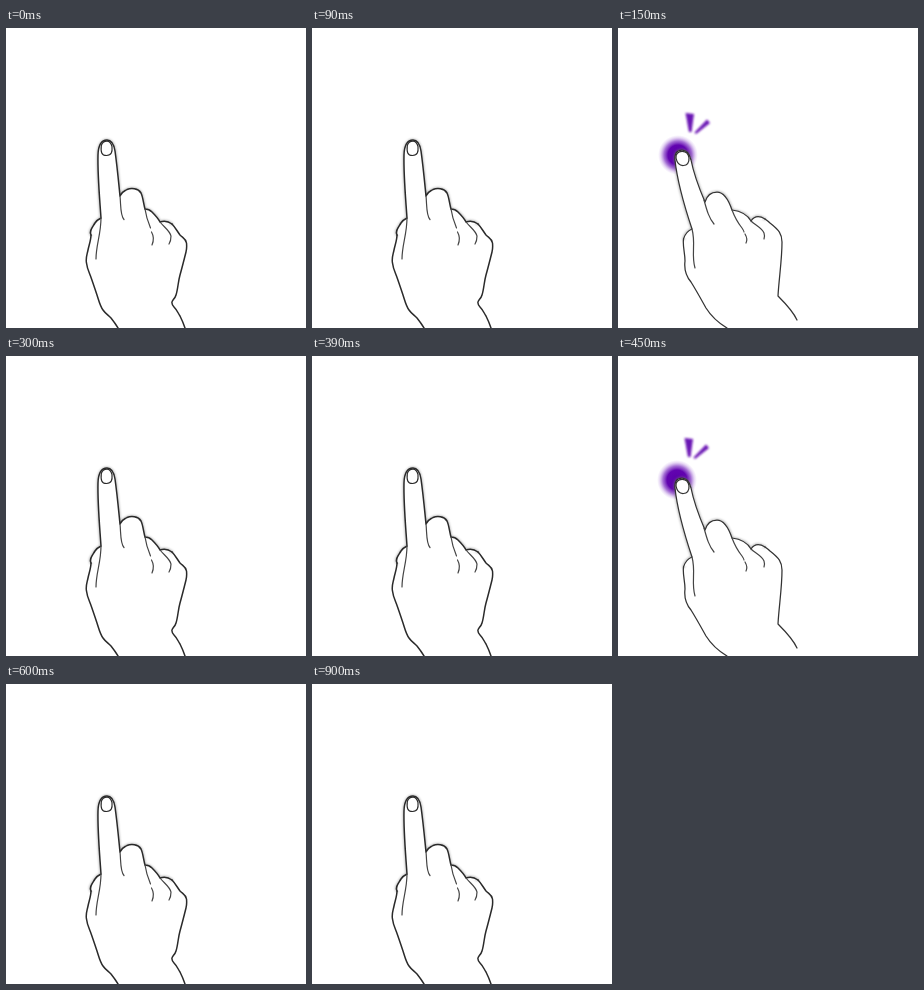
An HTML page that plays this animation: 300x300 px, repeating every 1100 ms.

```html
<!DOCTYPE html>
<html lang="en">
<head>
<meta charset="utf-8">
<title>Tapping finger</title>
<style>
  html, body { margin: 0; width: 100%; height: 100%; overflow: hidden; background: #fff; }
  svg { display: block; width: 100vw; height: 100vh; }
  .pose { fill: none; stroke-linecap: round; stroke-linejoin: round; }
  .skin { fill: #fff; }
  .halo { stroke: #777; stroke-width: 2.6; opacity: .5; filter: url(#soft); }
  .crease { stroke: #444; stroke-width: 1.2; }
  #rest { stroke: #2a2a2a; stroke-width: 1.5; }
  #press { stroke: #333; stroke-width: 1.25; }
  #press, #tap { visibility: hidden; }
</style>
</head>
<body>
<svg viewBox="0 0 300 300">
  <defs>
    <radialGradient id="glow">
      <stop offset="0" stop-color="#5a00a8"/>
      <stop offset=".5" stop-color="#6204b0"/>
      <stop offset=".7" stop-color="#7a2cc0" stop-opacity=".68"/>
      <stop offset=".87" stop-color="#9a5cd2" stop-opacity=".24"/>
      <stop offset="1" stop-color="#b98ae2" stop-opacity="0"/>
    </radialGradient>
    <filter id="soft" x="-20%" y="-20%" width="140%" height="140%"><feGaussianBlur stdDeviation="1"/></filter>
    <filter id="haze" x="-20%" y="-20%" width="140%" height="140%"><feGaussianBlur stdDeviation=".8"/></filter>

    <!-- fingers, from thumb side to little finger -->
    <path id="restTop" d="M85 207C83 203 86 200 89 195Q91 192 95 190C93.500 168 91.500 147 92 127C92.300 117 96 112 101 112C105.500 112 108 117 109 123C111 137 112.500 153 114 168C116 163 119 163 121 161.500C125 160 132 160 135 165C137 169 137.500 176 139 181C142 181 144 182 146 184C149 187 152 190 154 194C158 192.500 162 193 166 196"/>
    <path id="pressTop" d="M65.500 211C67 206 69 203 74 201C65 174 59 151 57 132C56.500 125 59 122 64 122C69 122 71.500 125.500 73 132C76 147 81 160 87 174C89 167 94 164 99 164C107 164 111 173 114 182C122 183 129 186 133 193C137 187 142 188 147 191"/>
  </defs>

  <g id="tap">
    <circle cx="60" cy="127" r="20" fill="url(#glow)"/>
    <g fill="#6a12b4" filter="url(#haze)">
      <path d="M67.500 85L76 86L73.500 104L71 104Z"/>
      <path d="M89 91.500L92 95L78 106L76.500 104.500Z"/>
    </g>
  </g>

  <g id="rest" class="pose">
    <use href="#restTop" class="halo"/>
    <use href="#restTop" class="skin"/>
    <path d="M85 207C85 212 83 217 82 222C81 227 79.500 230 80.500 235C81 240 83 244 84.500 248C87 255 89 261 91 267C93 273 94 278 97 282C99 285 102 287 105 290Q109 295 112 300"/>
    <path d="M166 196C169 199 171 203 174 207C177 210 180 211 180.500 215Q181 220 180 224C178 232 176 240 174 247C172 254 172 261 170 267C169 271 165 273 166 275C166 277 167 278 168 279C171 282 172 285 174 288Q177 294 179 300"/>
    <path class="crease" d="M95 190C95 206 90 217 90 231M114 168C115 177 114 187 118 191.500M139 181C140 188 142 194 144.500 200M145.500 204Q149 210 146 217M154 194C158 199 164 203 165 208Q165 213 163 216"/>
    <path d="M95.300 117.500C94.600 124 95.500 127.500 100.500 127.500C105.500 127.500 106.500 124 106 118.500C105 115 103.500 113.200 101 113.200C98 113.200 96 115 95.300 117.500Z" stroke-width="1.2"/>
  </g>

  <g id="press" class="pose">
    <use href="#pressTop" class="halo"/>
    <use href="#pressTop" class="skin"/>
    <path d="M65.500 211C64.500 218 67 225 67 233C66 241 68 248 73 254C78 262 83 271 88 280C93 288 99 294 109 300"/>
    <path d="M147 191Q150 193 152 195C161 202 164 206 164 214C164 232 161 250 160 268C166 274 175 283 179 292"/>
    <path class="crease" d="M74 201C78 216 73 226 77 240M86 172C89 183 91 190 96 196M114 182C117 190 120 195 124 200M124 200Q126 203 126 204M127 206Q130 211 128 215M133 193C137 197 144 200 146 205Q147 208 146 211"/>
    <path d="M58 130C57.500 126 60 123.500 64 123.300C68 123.200 70.500 126 71 130C71.300 135 69 137.300 65.500 137.500C61 137.800 59 135 58 130Z"/>
  </g>
</svg>
<script>
  const LOOP = 1100;
  // start time, finger down, shift of the tap burst
  const steps = [
    [0, false, 0, 0],
    [150, true, 0, 0],
    [300, false, 0, 0],
    [450, true, -1, -3],
    [600, false, 0, 0]
  ];
  const [rest, press, tap] = ['rest', 'press', 'tap'].map(id => document.getElementById(id));

  function show(time) {
    const t = time % LOOP;
    const [, down, x, y] = steps.filter(s => s[0] <= t).pop();
    rest.style.visibility = down ? 'hidden' : 'visible';
    press.style.visibility = tap.style.visibility = down ? 'visible' : 'hidden';
    tap.setAttribute('transform', `translate(${x} ${y})`);
  }

  const start = performance.now();
  function tick() {
    show(performance.now() - start);
    requestAnimationFrame(tick);
  }
  tick();
</script>
</body>
</html>
```
